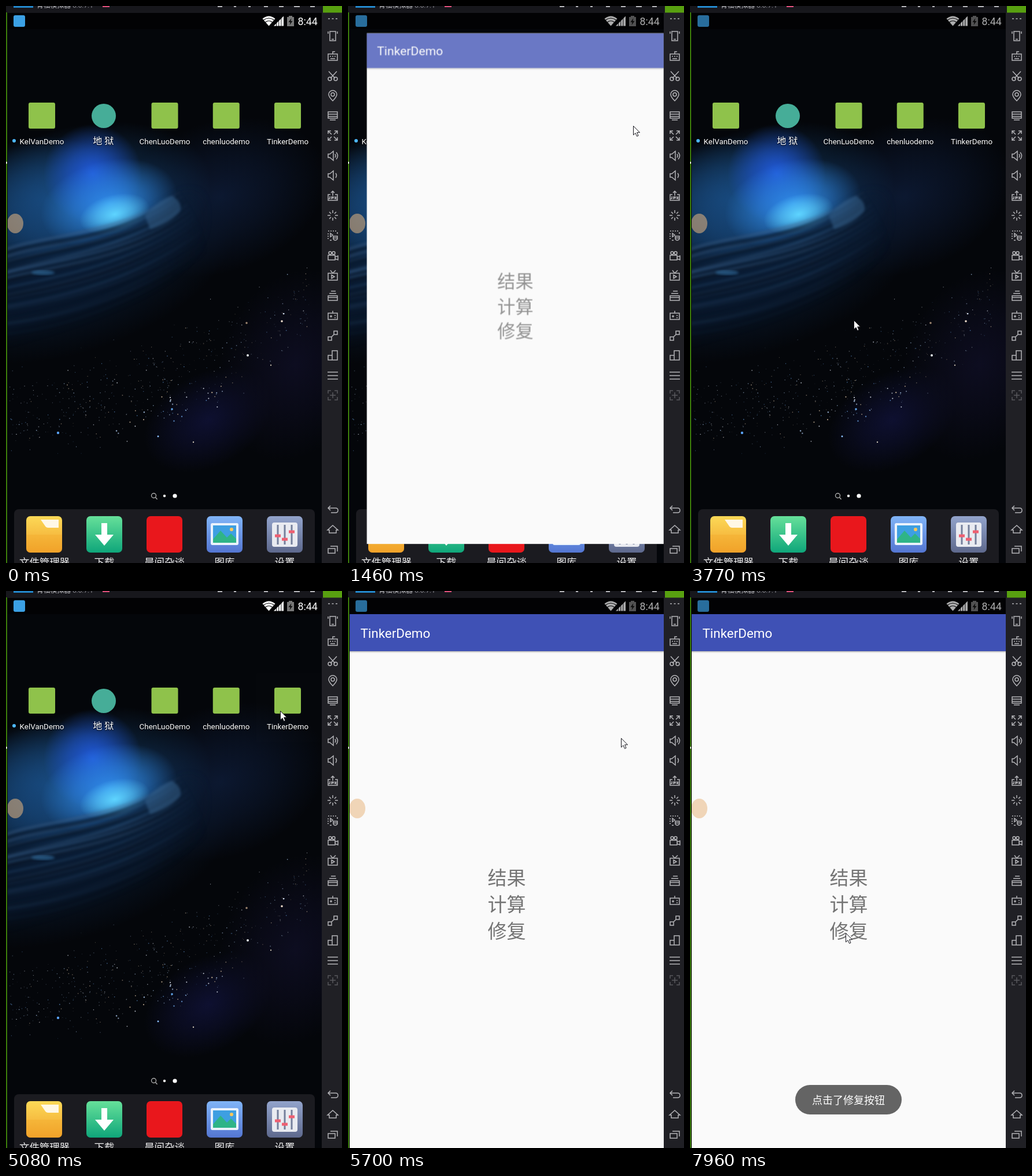
Recreate the animation shown at these times as an HTML page. Size 581 by 963 pixels, loop 8000 ms.

```html
<!DOCTYPE html>
<html lang="zh-CN">
<head>
<meta charset="utf-8">
<title>TinkerDemo</title>
<style>
html, body { margin: 0; width: 100%; height: 100%; overflow: hidden; background: #04060a; }
svg { position: absolute; left: 0; top: 0; width: 581px; height: 963px; overflow: hidden; }
text { font-family: Roboto, "Noto Sans CJK SC", "Noto Sans CJK", sans-serif; }
filter { color-interpolation-filters: sRGB; }
.mid { text-anchor: middle; }
.label { font-size: 13.4px; fill: #fff; text-shadow: 0 1px 2px #000; }
.dock { font-size: 17.4px; font-weight: 500; fill: #eee; }
.tools { fill: none; stroke: #b4b4b8; stroke-width: 1.5; }

.app { transform-origin: 545px 157px; animation: open 8s linear infinite; }
.content { animation: reveal 8s linear infinite; }
.status { animation: dim 8s step-end infinite; }
.toast { animation: toast 8s linear infinite; }
.cursor { animation: move 8s linear infinite, enter 8s step-end infinite; }

@keyframes open {
  0%, 16.125% { transform: scale(.2, .12); opacity: 0; }
  17.125% { transform: scale(.72, .69); opacity: .8; }
  18.25% { transform: scale(.945, .94); opacity: 1; }
  19.125% { transform: scale(.988, .987); }
  20.125%, 47.12% { transform: none; opacity: 1; }
  47.125%, 63.5% { transform: scale(.2, .12); opacity: 0; }
  64.5% { transform: scale(.72, .69); opacity: .8; }
  65.625% { transform: scale(.945, .94); opacity: 1; }
  66.5% { transform: scale(.988, .987); }
  67.5%, 100% { transform: none; opacity: 1; }
}
@keyframes reveal {
  0%, 17% { opacity: 0; }
  18.25% { opacity: .77; }
  20.125%, 47.12% { opacity: 1; }
  47.125%, 64.4% { opacity: 0; }
  65.625% { opacity: .77; }
  67.5%, 100% { opacity: 1; }
}
@keyframes dim {
  0% { opacity: 1; }
  17.125% { opacity: .68; }
  48.125% { opacity: 1; }
  64.5%, 100% { opacity: .68; }
}
@keyframes toast {
  0%, 93.2% { opacity: 0; }
  97.5%, 100% { opacity: 1; }
}
@keyframes enter {
  0% { opacity: 0; }
  3.5%, 100% { opacity: 1; }
}
@keyframes move {
  0%, 3.5% { transform: translate(568px, 902px); }
  7% { transform: translate(540px, 500px); }
  10.25% { transform: translate(489px, 216px); }
  11.375%, 22.25% { transform: translate(493px, 207px); }
  26.25% { transform: translate(395px, 318px); }
  28.75% { transform: translate(338px, 430px); }
  32.625% { transform: translate(292px, 538px); }
  33.625%, 47.5% { transform: translate(283px, 543px); animation-timing-function: ease-in-out; }
  55.875%, 57.2% { transform: translate(465px, 208px); }
  58.75%, 69% { transform: translate(474px, 207px); }
  71.25% { transform: translate(472px, 254px); }
  73.125% { transform: translate(464px, 281px); }
  76% { transform: translate(375px, 430px); }
  80%, 100% { transform: translate(269px, 591px); }
}
</style>
</head>
<body>
<svg viewBox="0 0 581 963">
  <defs>
    <filter id="mist" x="-50%" y="-50%" width="200%" height="200%"><feGaussianBlur stdDeviation="14"/></filter>
    <filter id="fine" x="-10%" y="-10%" width="120%" height="120%"><feGaussianBlur stdDeviation="2"/></filter>
    <linearGradient id="fade" gradientUnits="userSpaceOnUse" x1="190" y1="400" x2="335" y2="360"><stop offset="0" stop-color="#fff"/><stop offset="1" stop-color="#000"/></linearGradient>
    <mask id="tail" maskUnits="userSpaceOnUse" x="0" y="0" width="581" height="963"><rect width="581" height="963" fill="url(#fade)"/></mask>
    <linearGradient id="yellow" x2="0" y2="1"><stop offset="0" stop-color="#fcd957"/><stop offset="1" stop-color="#f1a22c"/></linearGradient>
    <linearGradient id="green" x2="0" y2="1"><stop offset="0" stop-color="#66e09a"/><stop offset="1" stop-color="#0fa67a"/></linearGradient>
    <linearGradient id="blue" x2="0" y2="1"><stop offset="0" stop-color="#80b4f7"/><stop offset="1" stop-color="#5476d2"/></linearGradient>
    <linearGradient id="slate" x2="0" y2="1"><stop offset="0" stop-color="#92a3cb"/><stop offset="1" stop-color="#5e698d"/></linearGradient>
  </defs>
  <rect width="581" height="963" fill="#04060a"/>

  <g id="glows"></g>
  <path d="M-30 445Q130 425 215 388T320 330Q350 400 260 460T-30 570Z" fill="#0a1a30" opacity=".75" filter="url(#mist)"/>
  <g mask="url(#tail)"><g id="strands" fill="none" filter="url(#fine)"></g></g>
  <path d="M240 362Q262 336 287 328Q306 340 301 355Q282 377 249 386Z" fill="#386590" opacity=".5" filter="url(#fine)"/>
  <ellipse cx="64" cy="461" rx="20" ry="4" fill="#3c86c0" opacity=".5" filter="url(#fine)"/>
  <g id="stars"></g>

  <g id="launcher"></g>
  <circle cx="14" cy="233" r="3" fill="#4db8ff"/>
  <g fill="#fff">
    <path d="M258.500 849.500L261.500 853M259.500 846.500a4 4 0 1 1-8 0a4 4 0 1 1 8 0Z" fill="none" stroke="#aaa" stroke-width="1.4"/>
    <circle cx="274" cy="847" r="2.2"/><circle cx="292" cy="847" r="3.6"/>
  </g>

  <rect x="14" y="870" width="520" height="110" rx="8" fill="#1b1b20"/>
  <rect x="35" y="882" width="62" height="63" rx="7" fill="url(#yellow)"/>
  <path d="M60 888H91V902H73Q69 902 67 898Z" fill="#fff8e6"/>
  <path d="M35 914H97V938a7 7 0 0 1-7 7H42a7 7 0 0 1-7-7Z" fill="#ef9f20" opacity=".25"/>
  <rect x="139" y="882" width="62" height="63" rx="7" fill="url(#green)"/>
  <path d="M165 894H175V914H186L170 933L154 914H165Z" fill="#fff"/>
  <rect x="243" y="882" width="62" height="63" rx="7" fill="#e9171c"/>
  <rect x="347" y="882" width="62" height="63" rx="7" fill="url(#blue)"/>
  <rect x="354" y="894" width="48" height="38" rx="3" fill="#e9f2fc"/>
  <rect x="358" y="898" width="40" height="30" fill="#3e9fe2"/>
  <path d="M358 928V922L371 907L382 919L389 912L398 921V928Z" fill="#2fb487"/>
  <circle cx="390" cy="905" r="3" fill="#ffc758"/>
  <rect x="451" y="882" width="62" height="63" rx="7" fill="url(#slate)"/>
  <rect x="460" y="893" width="44" height="42" rx="4" fill="#e9ebf1"/>
  <path d="M470 897V931M482 897V931M494 897V931" stroke="#75809c" stroke-width="3"/>
  <path d="M465 916H475M477 922H487M489 909H499" stroke="#ee6072" stroke-width="5"/>
  <g class="mid dock">
    <text x="66.500" y="968">文件管理器</text><text x="170" y="968">下载</text>
    <text x="274" y="968">晨间杂谈</text><text x="378" y="968">图库</text><text x="482" y="968">设置</text>
  </g>
</svg>

<svg viewBox="0 0 581 963">
  <rect y="11" width="581" height="29" fill="#020204"/>
  <g class="status">
    <rect x="13" y="16" width="20" height="20" rx="3" fill="#3ba0e4"/>
    <path d="M443.500 22Q454.500 13 465.500 22L454.500 34.500Z" fill="#fff"/>
    <path d="M445 24.500Q454.500 17.500 464 24.500M448.500 28Q454.500 23.500 460.500 28" fill="none" stroke="#020204" stroke-width="1.2"/>
    <path d="M463 34.500L480 17.500V34.500Z" fill="#fff"/>
    <path d="M467.500 17V35M471.700 17V35M475.900 17V35" stroke="#020204" stroke-width=".9"/>
    <path d="M489 17H495V19H498V35H486V19H489Z" fill="#777"/>
    <path d="M493.500 21L488.500 28H491.500L490.500 33L495.500 26H492.500Z" fill="#111"/>
    <text x="504.500" y="33" font-size="17.800" fill="#fff">8:44</text>
  </g>

  <g class="app">
    <rect x="3" y="40" width="543" height="939" fill="#fafafa"/>
    <g class="content">
      <path d="M3 104.500H546" stroke="#b5b5b5"/><path d="M3 106H546" stroke="#e2e2e2" stroke-width="2"/>
      <rect x="3" y="40" width="543" height="64" fill="#3f51b5"/>
      <text x="21.500" y="80.500" font-size="22.400" fill="#fff">TinkerDemo</text>
      <g class="mid" font-size="33" fill="#747474">
        <text x="274.500" y="508">结果</text><text x="274.500" y="554">计算</text><text x="274.500" y="599.500">修复</text>
      </g>
    </g>
  </g>
  <ellipse cx="16" cy="376" rx="14" ry="17" fill="#e8b77f" opacity=".55"/>

  <g class="toast">
    <rect x="182" y="854" width="184" height="51" rx="25.500" fill="#646464"/>
    <text class="mid" x="274" y="887" font-size="18" fill="#fff">点击了修复按钮</text>
  </g>

  <rect width="548" height="12" fill="#17171c"/>
  <rect x="13" width="34" height="3" fill="#2386c8"/>
  <text x="53" y="2.500" font-size="11.800" fill="#c8c8cc">青柚模拟器 <tspan fill="#8a8a90">6.0.7.1</tspan></text>
  <rect x="167" width="12" height="2" fill="#e0507c"/>
  <path d="M366 1H374M394 1H398M419 1H423M446 1H453M472 1H480M498 1H508M526 1H534" stroke="#b4b4b8" stroke-width="2"/>
  <rect x="546" y="11" width="35" height="952" fill="#202025"/>
  <rect x="548" width="33" height="11.500" fill="#58a010"/>
  <rect y="11" width="2" height="952" fill="#3a7a0a"/>
  <rect x="2" y="11" width="1" height="952" fill="#08080a"/>
  <circle cx="0" cy="271" r="2" fill="#eee"/>
  <g id="tools" class="tools"></g>

  <path class="cursor" d="M.5 .5V16L4 12.700L6.500 18.300L9 17.200L6.600 11.700H11.500Z" fill="#fff" stroke="#15151c"/>
</svg>

<script>
const byId = id => document.getElementById(id);
const fill = (id, parts) => { byId(id).innerHTML = parts.join(''); };
const list = (n, make) => Array.from({ length: n }, (_, i) => make(i));

let seed = 41;
const rand = () => (seed = seed * 16807 % 2147483647) / 2147483647;
const spread = () => rand() + rand() + rand() - 1.5;
const pick = items => items[Math.floor(rand() * items.length)];

const glow = (color, cx, cy, rx, ry, tilt = 0) => {
  const id = `glow${color.slice(1)}`;
  return `<radialGradient id="${id}"><stop stop-color="${color}"/>
    <stop offset=".5" stop-color="${color}" stop-opacity=".55"/>
    <stop offset="1" stop-color="${color}" stop-opacity="0"/></radialGradient>
    <ellipse cx="${cx}" cy="${cy}" rx="${rx}" ry="${ry}" transform="rotate(${tilt} ${cx} ${cy})" fill="url(#${id})"/>`;
};
fill('glows', [
  glow('#0c1830', 370, 330, 190, 130, -20),
  glow('#0a1c34', 110, 440, 300, 160, -18),
  glow('#153f6c', 120, 350, 240, 140, -16),
  glow('#17487c', 70, 335, 150, 110),
  glow('#2058d8', 150, 290, 85, 85),
  glow('#2f8ae8', 178, 342, 120, 75, -14),
  glow('#5ed4ff', 188, 360, 62, 34, -14),
  glow('#0e1030', 350, 715, 120, 80, -30),
  glow('#0d0d20', 500, 620, 130, 170, 20)
]);

// Arms of the galaxy: long curves fanning out below the core
fill('strands', list(40, i => {
  const y = 424 + i * 3.6 + spread() * 8, endX = 300 + i * 1.6, endY = 322 + i * 2.4;
  const light = i % 3 === 0;
  const color = light ? pick(['#4d83b5', '#2c639c', '#3c5c80']) : pick(['#0a1c33', '#050c18', '#0b2440']);
  const opacity = (light ? .42 : .6) * (1 - i / 42);
  return `<path d="M-5 ${y}C${70 + i} ${y - 30 + i * .5},${205 + i} ${396 + i * 2.8},${endX} ${endY}"
    stroke="${color}" stroke-width="${1.5 + rand() * 5}" opacity="${opacity}"/>`;
}));

const star = (x, y, r, color, opacity = 1) =>
  `<circle cx="${x}" cy="${y}" r="${r}" fill="${color}" opacity="${opacity}"/>`;
const tints = ['#9db8d8', '#5f8fc8', '#b9a58c', '#7e8fa8', '#d6dde8'];
fill('stars', [
  ...list(480, () => {
    const u = rand();
    return star(5 + u * 520, 712 - 195 * u ** 1.5 + spread() * 75, .4 + rand() * .55, pick(tints), .2 + rand() * .6);
  }),
  ...list(34, () => {
    const u = rand();
    return star(185 + u * 200, 728 - u * 66 + spread() * 24, .7 + rand() * .6, pick(tints), .9);
  }),
  star(90, 738, 2.2, '#5aa2f5'), star(287, 697, 1.8, '#62a9f0'), star(418, 604, 2, '#e8eef0'),
  star(477, 545, 1.8, '#f3e2d0'), star(416, 548, 1.8, '#a08872'), star(263, 744, 1.5, '#8dc3ff'),
  star(480, 532, 1.3, '#d8dde8'), star(458, 621, 1.2, '#b8b0a0'), star(324, 754, 1.2, '#cfc8b8')
]);

const names = ['KelVanDemo', '地 狱', 'ChenLuoDemo', 'chenluodemo', 'TinkerDemo'];
fill('launcher', names.map((name, i) => {
  const x = 62 + i * 106.25;
  const icon = i === 1
    ? `<circle cx="169" cy="190" r="21" fill="#46ad98"/>`
    : `<rect x="${x - 23}" y="167" width="46" height="45" rx="3" fill="#8fc24b"/>`;
  return `${icon}<text class="mid label" x="${x}" y="239" ${i === 1 ? 'style="font-size:16px"' : ''}>${name}</text>`;
}));

const tools = [
  [22, 'M-8 0h3M-1.5 0h3M5 0h3'],
  [52, 'M-5-8H5V8H-5ZM-2 5.500h4M-8-8V-4M8-8V-4'],
  [87, 'M-8-4H8V7H-8ZM0-4V-8H4M-5 0h2M-1 0h2M3 0h2M-4 4H4'],
  [121, 'M-7-8L4 4M7-8L-4 4M-8 5a3 3 0 1 0 6 0a3 3 0 1 0-6 0M2 5a3 3 0 1 0 6 0a3 3 0 1 0-6 0'],
  [155, 'M0 9Q-7 2-7-2A7 7 0 0 1 7-2Q7 2 0 9ZM-3-2a3 3 0 1 0 6 0a3 3 0 1 0-6 0'],
  [190, 'M-8-7H8V4H-8ZM-5 7H5M-8-3H8M-8 1H8'],
  [224, 'M-8-3V-8H-3M3-8H8V-3M8 3V8H3M-3 8H-8V3M-7-7L-2-2M7-7L2-2M7 7L2 2M-7 7L-2 2'],
  [259, 'M-8-3H-5L1-8V8L-5 3H-8ZM4-3Q6 0 4 3M6-6Q11 0 6 6'],
  [293, 'M-8-3H-5L1-8V8L-5 3H-8ZM5-4Q8 0 5 4'],
  [328, 'M-4-2H-8V8H8V-2H4M0 0V-8M-3-5L0-8L3-5M-5 1V5H-7M-2 6V2H1V4H-2M4 1V6M7 2L4 4L7 6'],
  [362, 'M0-9V-4M0 4V9M-9 0H-4M4 0H9M-6-6L-3-3M6 6L3 3M-6 6L-3 3M6-6L3-3'],
  [397, 'M-8-8h2M-4-8h2M0-8h2M4-8h2M-8-4v2M-8 0v2M-8 4v2M-5 8h3M8-6v3M-4-4L0-1L-4 2ZM1 1H8V6Q4 10 1 6ZM1 4H8'],
  [432, 'M-8-1H4V7H-8ZM4 2L9 0V7L4 5M-7-5a2.500 2.500 0 1 0 5 0a2.500 2.500 0 1 0-5 0M-1-5a2.500 2.500 0 1 0 5 0a2.500 2.500 0 1 0-5 0'],
  [466, 'M-8-4H8V8H-8ZM-4-9L0-4L5-9M-2-1V5L3 2Z'],
  [501, 'M-8 0H8V8H-8ZM-8 3H8M-6-4H6M-3-8H5'],
  [535, 'M-8-4H8V7H-8ZM0-4V-8M-5 1.500H-1M-3-.5V3.500M3 0h2M3 4h2'],
  [570, 'M-8 8V2H-2V8ZM2-8H8V-2H2ZM-2 2L2-2'],
  [604, 'M-8 8V0H-1V8ZM-1 8V-8H8V8Z'],
  [639, 'M-9-6H9M-9 0H9M-9 6H9'],
  [673, 'M-8-3V-8H-3M3-8H8V-3M8 3V8H3M-3 8H-8V3M-5 0H5M0-5V5', .38],
  [870, 'M-4-6L-8-2L-4 2M-8-2H5Q9-2 9 2T5 6H-3'],
  [905, 'M-9 1L0-7L9 1H6V6H-6V1Z'],
  [940, 'M-8-2H4V6H-8ZM-4-6H8V3']
];
fill('tools', tools.map(([y, d, opacity = 1]) => `<path d="${d}" transform="translate(565 ${y})" opacity="${opacity}"/>`));
</script>
</body>
</html>
```
